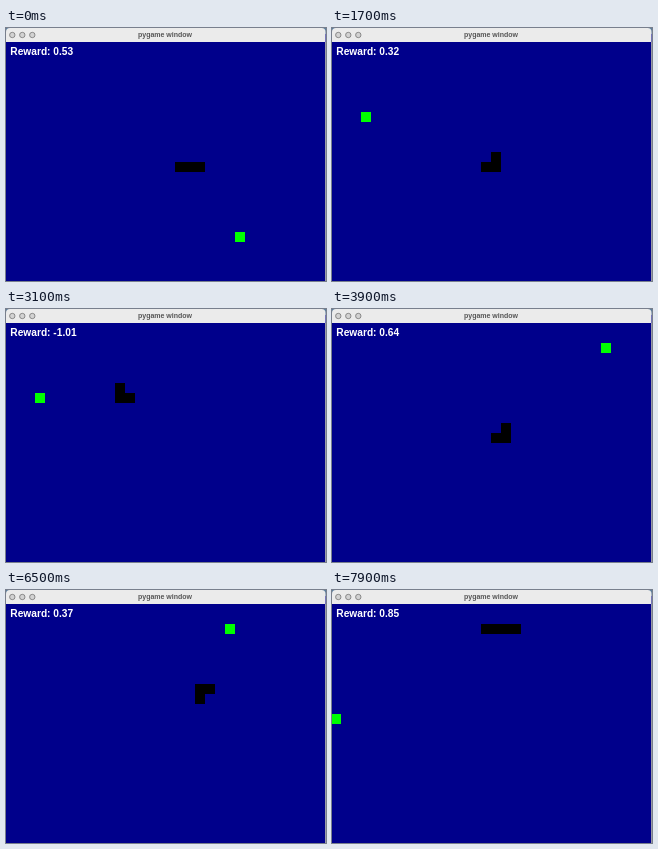
Recreate the animation shown at these times as an HTML page with a canvas. Size 320 by 253 pixels, loop 8 s.

```html
<!DOCTYPE html>
<html>
<head>
<meta charset="utf-8">
<style>
  html, body { margin: 0; width: 100%; height: 100%; overflow: hidden; background: #00008b; }
  canvas { display: block; width: 320px; height: 253px; }
</style>
</head>
<body>
<canvas id="stage"></canvas>
<script>
const canvas = document.getElementById('stage');
const ctx = canvas.getContext('2d');
const ratio = window.devicePixelRatio || 1;
canvas.width = 320 * ratio;
canvas.height = 253 * ratio;
ctx.scale(ratio, ratio);

const LOOP = 8000, TICK = 100;
const MOVES = { U: [0, -1], D: [0, 1], L: [-1, 0], R: [1, 0] };

// Each round: tick of its first move, food cells in order, moves from the centre
const rounds = [
  { first: -2, foods: [[23, 19]], moves: 'RRR' + 'DR'.repeat(4) + 'DDRULDRU' },
  { first: 17, foods: [[3, 7]], moves: 'UL'.repeat(4) + 'ULLURDRULDRU' },
  { first: 37, foods: [[27, 2]], moves: 'UR'.repeat(10) + 'U' },
  { first: 58, foods: [[22, 2], [0, 11]], moves: 'UR'.repeat(6) + 'UUUU' + 'LLLLLLL', skipAt: 72 }
];

const same = (a, b) => a[0] === b[0] && a[1] === b[1];
const distance = (a, b) => Math.hypot(a[0] - b[0], a[1] - b[1]);

function play(round, steps) {
  let body = [[16, 12], [15, 12], [14, 12]];
  let eaten = 0, reward = 0;
  for (const move of round.moves.slice(0, steps)) {
    const [dx, dy] = MOVES[move];
    const old = body[0], head = [old[0] + dx, old[1] + dy];
    const food = round.foods[eaten];
    reward = distance(old, food) - distance(head, food) - 0.01;
    body.unshift(head);
    if (same(head, food)) eaten++;
    else body.pop();
  }
  return { body, food: round.foods[eaten], reward };
}

function cell([col, row], color) {
  ctx.fillStyle = color;
  ctx.fillRect(col * 10 - 1, row * 10 + 14, 10, 10);
}

function drawWindow() {
  ctx.fillStyle = '#00008b';
  ctx.fillRect(0, 0, 320, 253);
  ctx.fillStyle = '#5f7f9c';
  ctx.fillRect(0, 0, 320, 6);
  ctx.fillStyle = '#ebebeb';
  ctx.beginPath();
  ctx.roundRect(0, 0, 319.5, 14, [4, 4, 0, 0]);
  ctx.fill();
  ctx.lineWidth = 0.8;
  ctx.strokeStyle = '#777';
  ctx.fillStyle = '#d2d2d2';
  for (const x of [6.3, 16.3, 26.3]) {
    ctx.beginPath();
    ctx.arc(x, 7, 2.7, 0, Math.PI * 2);
    ctx.fill();
    ctx.stroke();
  }
  ctx.fillStyle = '#555';
  ctx.font = 'bold 7px "Liberation Sans", Arial, sans-serif';
  ctx.textAlign = 'center';
  ctx.fillText('pygame window', 159, 9.3);
}

function draw(tick) {
  const round = rounds.findLast(r => tick >= r.first);
  const steps = tick - round.first + 1 + (tick >= round.skipAt ? 1 : 0);
  const { body, food, reward } = play(round, steps);
  drawWindow();
  body.forEach(part => cell(part, '#000'));
  cell(food, '#0f0');
  ctx.fillStyle = '#9a9aa8';
  ctx.fillRect(319, 14, 1, 239);
  ctx.fillStyle = '#fff';
  ctx.font = 'bold 10.2px "Liberation Sans", Arial, sans-serif';
  ctx.textAlign = 'left';
  ctx.fillText('Reward: ' + reward.toFixed(2), 4.3, 27);
}

const start = performance.now();
function frame() {
  draw(Math.floor((performance.now() - start) % LOOP / TICK));
  requestAnimationFrame(frame);
}
frame();
</script>
</body>
</html>
```
